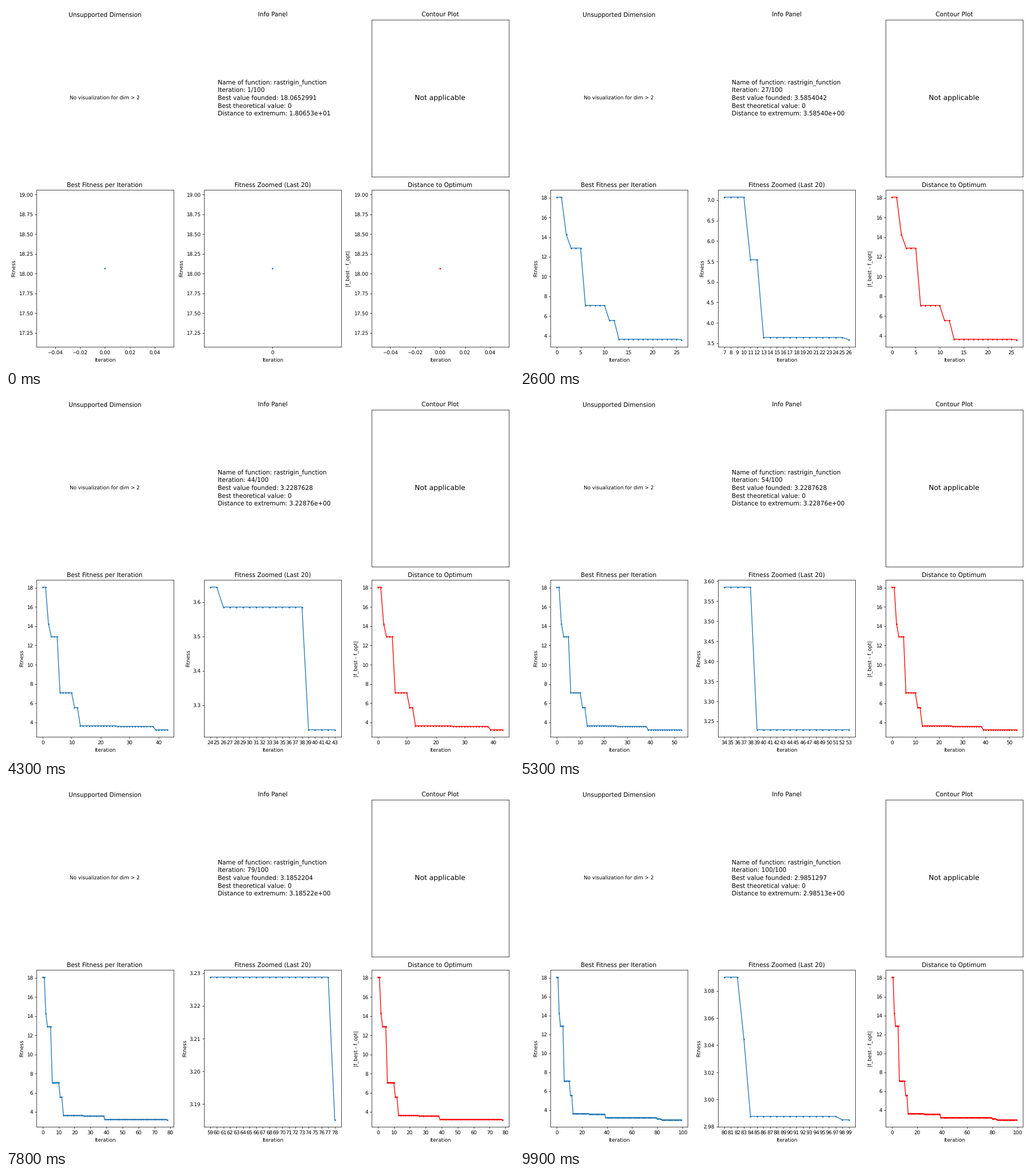
A matplotlib script for the animation above (10 s loop, 885 by 632 pixels).

```python
import matplotlib.pyplot as plt
import numpy as np
from matplotlib.animation import FuncAnimation

W, H, DPI = 885, 632, 63.2
LAYOUT_DPI = 100
STEPS = 100
WINDOW = 20
OPTIMUM = 0

# Iterations that found a new best, and its value
NEW_BEST = {
    0: 18.0652991, 2: 14.2534172, 3: 12.8930648, 6: 7.0745213, 11: 5.5436456,
    13: 3.6435127, 26: 3.5854042, 39: 3.2287628, 78: 3.1852204,
    80: 3.0900846, 83: 3.0444719, 84: 2.9876358, 98: 2.9851297,
}
iters = np.arange(STEPS)
best = np.minimum.accumulate([NEW_BEST.get(i, np.inf) for i in iters])

plt.rcParams["font.family"] = "DejaVu Sans"
fig, axes = plt.subplots(2, 3, figsize=(W / DPI, H / DPI), dpi=DPI)
(ax_view, ax_info, ax_contour), (ax_fit, ax_zoom, ax_dist) = axes

ax_view.set_title("Unsupported Dimension")
ax_view.text(0.5, 0.5, "No visualization for dim > 2", ha="center", va="center")
ax_view.axis("off")

ax_info.set_title("Info Panel")
info = ax_info.text(0.1, 0.5, "", fontsize=12, va="center", linespacing=1.37)
ax_info.axis("off")

ax_contour.set_title("Contour Plot")
ax_contour.text(0.5, 0.5, "Not applicable", fontsize=14, ha="center", va="center")
ax_contour.set(xticks=[], yticks=[])


def make_curve(ax, title, ylabel, color):
    ax.set(title=title, xlabel="Iteration", ylabel=ylabel)
    return ax.plot([], [], "o-", color=color, markersize=2)[0]


fit = make_curve(ax_fit, "Best Fitness per Iteration", "Fitness", "tab:blue")
zoom = make_curve(ax_zoom, f"Fitness Zoomed (Last {WINDOW})", "Fitness", "tab:blue")
dist = make_curve(ax_dist, "Distance to Optimum", "|f_best - f_opt|", "red")


def refresh(line, x, y):
    line.set_data(x, y)
    line.axes.relim()
    line.axes.autoscale(True)


def update(i):
    x, y = iters[:i + 1], best[:i + 1]
    info.set_text(
        "Name of function: rastrigin_function\n"
        f"Iteration: {i + 1}/{STEPS}\n"
        f"Best value founded: {best[i]:.7f}\n"
        f"Best theoretical value: {OPTIMUM}\n"
        f"Distance to extremum: {abs(best[i] - OPTIMUM):.5e}"
    )
    ax_zoom.set_xticks(x[-WINDOW:])
    refresh(fit, x, y)
    refresh(zoom, x[-WINDOW:], y[-WINDOW:])
    refresh(dist, x, np.abs(y - OPTIMUM))
    return info, fit, zoom, dist


# Measure the layout at full resolution, then draw small with unhinted text
update(0)
fig.set_dpi(LAYOUT_DPI)
fig.tight_layout()
fig.set_dpi(DPI)
plt.rcParams["text.hinting"] = "no_hinting"

anim = FuncAnimation(fig, update, frames=STEPS, init_func=lambda: update(0),
                     interval=100, repeat=True, repeat_delay=0)
plt.show()
```
